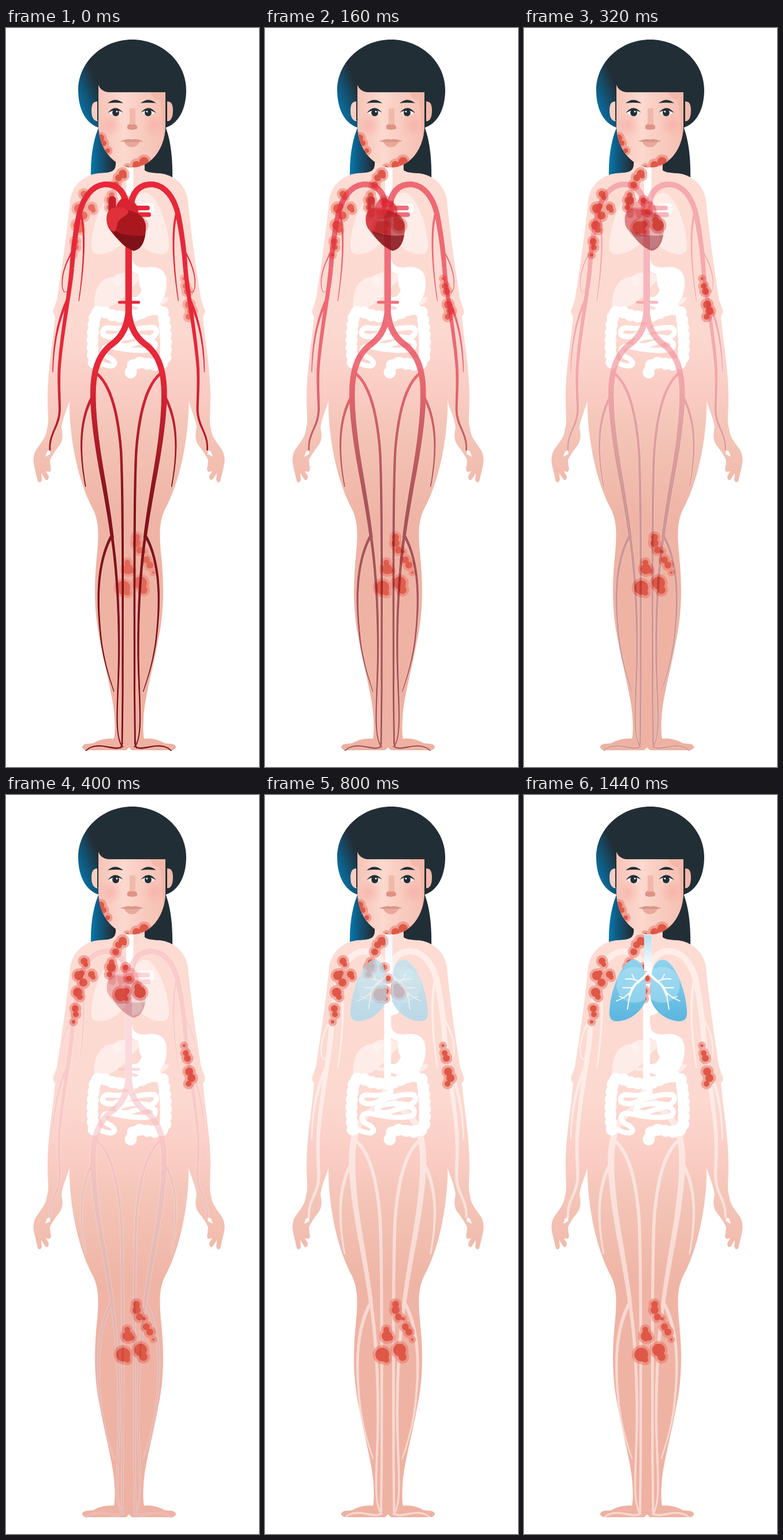
These frames come from a looping animation (438x1277 px, 1.52 s). An HTML page:

```html
<!DOCTYPE html>
<html lang="en">
<head>
<meta charset="utf-8">
<title>Body systems</title>
<style>
  html, body { margin: 0; width: 100%; height: 100%; overflow: hidden; background: #fff; }
  svg { display: block; width: 100vw; height: 100vh; }
</style>
</head>
<body>
<svg viewBox="0 0 438 1277" xmlns="http://www.w3.org/2000/svg">
  <defs>
    <linearGradient id="skin" gradientUnits="userSpaceOnUse" x1="0" y1="240" x2="0" y2="1250">
      <stop offset="0" stop-color="#fddcd3"/><stop offset=".28" stop-color="#fcd9d0"/>
      <stop offset=".395" stop-color="#facbc2"/><stop offset=".44" stop-color="#f4c6b9"/>
      <stop offset=".6" stop-color="#efb4a5"/><stop offset="1" stop-color="#eeb1a2"/>
    </linearGradient>
    <linearGradient id="face">
      <stop offset="0" stop-color="#f6c4b7"/><stop offset=".38" stop-color="#fcd8ce"/>
      <stop offset=".55" stop-color="#facfc4"/><stop offset="1" stop-color="#f5c0b2"/>
    </linearGradient>
    <linearGradient id="hair" gradientUnits="userSpaceOnUse" x1="126" y1="134" x2="166" y2="118">
      <stop offset="0" stop-color="#0870a4"/><stop offset=".4" stop-color="#115679"/><stop offset="1" stop-color="#222e36"/>
    </linearGradient>
    <linearGradient id="tail" gradientUnits="userSpaceOnUse" x1="147" y1="0" x2="186" y2="0">
      <stop offset="0" stop-color="#0879ae"/><stop offset=".3" stop-color="#0d5f89"/><stop offset="1" stop-color="#222e36"/>
    </linearGradient>
    <linearGradient id="blood" gradientUnits="userSpaceOnUse" x1="0" y1="590" x2="0" y2="830">
      <stop offset="0" stop-color="#e62839"/><stop offset=".4" stop-color="#b81f2b"/><stop offset="1" stop-color="#83131a"/>
    </linearGradient>
    <linearGradient id="air" gradientUnits="userSpaceOnUse" x1="0" y1="285" x2="0" y2="391">
      <stop offset="0" stop-color="#8fd3ee"/><stop offset="1" stop-color="#5bb5df"/>
    </linearGradient>
    <linearGradient id="pipe" gradientUnits="userSpaceOnUse" x1="0" y1="241" x2="0" y2="300">
      <stop offset="0" stop-color="#b5def0"/><stop offset="1" stop-color="#fff"/>
    </linearGradient>
    <radialGradient id="blush"><stop offset="0" stop-color="#f8a9a4" stop-opacity=".6"/><stop offset="1" stop-color="#f8a9a4" stop-opacity="0"/></radialGradient>
    <path id="facePath" d="M160 96V168C160 212 190 241 218 241C250 241 276 210 276 168V108Z"/>
    <clipPath id="inFace"><use href="#facePath"/></clipPath>
    <path id="side" d="M213 236H190C189 249 180 250 160 251C134 254 115 272 111 297C107 345 96 420 88 470L82 487Q80 492 85 498C81 545 72 590 72 640C72 666 75 680 71 692C70 706 62 715 52 729C46 740 47 750 50 762L55 783Q59 788 62 781L61 769L68 780Q74 784 74 774L69 766L76 767Q79 764 77 757L76 747Q80 737 92 722C100 712 98 700 96 690C99 670 108 655 109.500 644C110 720 128 790 150 830C160 850 161 870 158 905C152 960 152 1010 163 1060C172 1110 187 1160 188 1195C189 1215 188 1222 187 1228C170 1227 160 1231 151 1236L139 1237Q131 1239 132 1244L137 1248H208L213 1243Z"/>
    <path id="lung" d="M187 285C173 287 151 328 148 372C147 386 151 391 162 391C185 390 205 372 210 355C212 340 211 310 205 295C200 287 194 284 187 285Z"/>
    <clipPath id="inLung"><use href="#lung"/></clipPath>
    <g id="vesselSide"></g>
    <g id="vesselTree">
      <use href="#vesselSide"/><use href="#vesselSide" transform="matrix(-1 0 0 1 424.500 0)"/>
      <path d="M206.500 320H218V500L212.300 510L206.500 500Z"/><rect x="194" y="471.500" width="38" height="5" rx="2"/>
    </g>
    <g id="airSide">
      <use href="#lung" fill="url(#air)"/>
      <circle cx="191" cy="328" r="31" fill="#c4ebf8" opacity=".4" clip-path="url(#inLung)"/>
    </g>
    <g id="twigs" fill="none" stroke="#fff" stroke-linecap="round">
      <path stroke-width="4" d="M215 306Q209 314 199 322Q188 329 183 346"/>
      <path stroke-width="1.800" d="M199 322Q186 316 176 318M192 320L187 310M186 338Q176 350 160 356M183 346L179 370M173 351L165 348M188 333L171 333"/>
    </g>
  </defs>

  <g fill="#222e36">
    <path fill="url(#tail)" d="M162 168C152 190 146 220 147 257H200V168Z"/>
    <path d="M230 168H275C284 190 289 220 288 264L230 250Z"/>
  </g>

  <g fill="url(#skin)">
    <use href="#side"/><use href="#side" transform="matrix(-1 0 0 1 426 0)"/>
    <path d="M190 215H240V252H190Z"/><rect x="212" y="236" width="2" height="1007"/>
  </g>
  <g fill="#fff">
    <path d="M71 732L76 730L77 736L68 741Z"/><path d="M355 732L350 730L349 736L358 741Z"/>
  </g>

  <g id="head">
    <path fill="url(#hair)" d="M125 108C125 59 167 20 218.500 20C270 20 312 59 312 107C312 140 299 166 274 173V108H164V173C140 168 125 142 125 108Z"/>
    <path fill="#f8cdc2" d="M159 127Q148 126 148 142Q148 159 157 161H159Z"/>
    <path fill="#f3b8aa" d="M279 127Q289 126 289 142Q289 159 281 161H279Z"/>
    <use href="#facePath" fill="url(#face)"/>
    <path fill="#f0b3a4" d="M250 108H276V168C276 177 275 184 273 191C270 174 272 140 265 124Q251 123 250 108Z" opacity=".6"/>
    <path fill="#222e36" d="M158 94H279V160H276V111H178C167 110 162 104 160 98V160H158Z"/>
    <circle cx="180" cy="168" r="21" fill="url(#blush)"/><circle cx="256" cy="168" r="21" fill="url(#blush)"/>
    <path fill="#efb9ab" d="M214 139H224V166L227 174H210L214 164Z"/>
    <path fill="#df9283" d="M210 169Q212 165 218 167Q225 165 227 170Q228 175 224 175L218 176L212 175Q209 174 210 169Z"/>
    <path fill="#e8a99b" d="M204 196H232Q227 206 218 206Q209 206 204 196Z"/>
    <path fill="#d9968a" d="M197 196Q212 190 218 193Q224 190 238 196Q226 197 218 197Q208 197 197 196Z"/>
    <g id="eye">
      <path fill="#222e36" d="M176 130Q189 118.500 203 130Q190 128 176 130Z"/>
      <path fill="#fff" d="M179 147Q189 138 200 147Q190 155 179 147Z"/>
      <circle cx="190" cy="146.500" r="6" fill="#222e36"/><circle cx="192" cy="144.500" r="1.400" fill="#fff"/>
      <path fill="#222e36" d="M176 147Q189 130 202.500 146Q189 138 176 147Z"/>
    </g>
    <use href="#eye" transform="matrix(-1 0 0 1 436 0)"/>
  </g>

  <g id="organs" fill="#fff">
    <g opacity=".48"><use href="#lung"/><use href="#lung" transform="matrix(-1 0 0 1 430 0)"/></g>
    <path opacity=".5" d="M153 487C150 455 162 431 186 430C200 417 235 422 232 434L206 462C190 481 172 485 153 487Z"/>
    <circle cx="193" cy="437" r="8" opacity=".35"/>
    <path opacity=".5" d="M258 473Q270 463 282 466Q281 476 260 482Z"/>
    <path d="M208 241H220.500V320H208Z"/>
    <path opacity=".7" d="M232 303H254Q258 307 254 311H257Q259 318 250 325H232Z"/>
    <path d="M214 345C228 347 237 358 235 370Q232 380 218 381Z"/>
    <path d="M217 380C217 408 222 413 240 414C264 410 278 418 278 440C278 470 262 486 243 486C228 486 219 477 213 480L215 464C228 468 232 460 235 452C226 440 235 428 226 424C214 421 211 410 211 380Z"/>
    <rect x="206.500" y="318" width="11" height="180"/>
    <g fill="none" stroke="#fff" stroke-linecap="round" stroke-linejoin="round">
      <path stroke-width="21" stroke-dasharray="0 13" d="M152 578Q146 540 155 492Q166 487 180 495Q212 505 240 490Q262 480 272 492Q280 540 275 576Q262 586 240 579Q215 575 216 597"/>
      <path stroke-width="17" d="M152 576Q147 540 156 492Q166 489 180 495Q212 503 240 491Q262 483 271 492Q278 540 274 574Q262 582 240 579Q218 576 216 595"/>
      <path stroke-width="9" d="M218 490V512Q207 522 176 518Q165 520 168 530Q180 538 200 528Q238 515 257 518Q267 527 250 536Q215 529 195 540Q189 549 210 549L246 538Q264 542 256 554Q235 561 190 552Q168 546 168 558Q172 569 180 570Q194 580 183 584Q172 584 164 579"/>
    </g>
  </g>
  <use href="#vesselTree" fill="#fff" stroke="#fff" stroke-width="1" opacity=".5"/>

  <g id="neckRash"></g>
  <g id="faceRash" clip-path="url(#inFace)"></g>
  <g id="bodyRash"></g>

  <g id="vessels"><use href="#vesselTree" fill="url(#blood)"/></g>
  <g id="heart">
    <path fill="none" stroke="#c51f2b" stroke-width="13" stroke-linecap="round" d="M184 297V322"/>
    <path fill="none" stroke="#e62839" stroke-width="8" stroke-linecap="round" d="M206 302V320M219 302V320M222 311H245M228 322.500H247"/>
    <path fill="#d82431" d="M190 310C196 293 207 289 216 300Q231 301 229 326L196 330Z"/>
    <path fill="#ab171f" d="M188 312C174 314 172 335 178 346C186 358 202 377 221 385C236 382 243 362 242 341C239 322 222 316 205 314Z"/>
    <path fill="#7f1118" d="M183 348Q205 362 241 358C239 372 233 383 221 385C207 380 195 370 183 348Z"/>
    <path fill="#e0303a" d="M174 328Q175 312 190 310Q211 309 212 319C208 325 196 329 193 337Q192 347 188 352Q174 349 174 328Z"/>
  </g>

  <g id="lungVeil" fill="#cfe4ec">
    <use href="#lung"/><use href="#lung" transform="matrix(-1 0 0 1 430 0)"/>
  </g>
  <g id="lungs">
    <rect x="208" y="242" width="12.500" height="62" fill="url(#pipe)"/>
    <use href="#airSide"/><use href="#airSide" transform="matrix(-1 0 0 1 430 0)"/>
    <use href="#twigs"/><use href="#twigs" transform="matrix(-1 0 0 1 430 0)"/>
  </g>
</svg>
<script>
const $ = id => document.getElementById(id);
const NS = 'http://www.w3.org/2000/svg';

// Outline of a stroke whose width runs from w0 to w1.
function taper(d, w0, w1) {
  const path = document.createElementNS(NS, 'path');
  path.setAttribute('d', d);
  const length = path.getTotalLength(), steps = Math.ceil(length / 8);
  const left = [], right = [];
  for (let i = 0; i <= steps; i++) {
    const s = length * i / steps;
    const p = path.getPointAtLength(s);
    const a = path.getPointAtLength(Math.max(0, s - 1));
    const b = path.getPointAtLength(Math.min(length, s + 1));
    const angle = Math.atan2(b.y - a.y, b.x - a.x);
    const half = (w0 + (w1 - w0) * i / steps) / 2;
    const dx = -Math.sin(angle) * half, dy = Math.cos(angle) * half;
    left.push(`${(p.x + dx).toFixed(1)} ${(p.y + dy).toFixed(1)}`);
    right.unshift(`${(p.x - dx).toFixed(1)} ${(p.y - dy).toFixed(1)}`);
  }
  return `<path d="M${left.concat(right).join('L')}Z"/>`;
}

$('vesselSide').innerHTML = [
  ['M209 310C206 281 192 270 172 270C145 272 131 300 126 325C120 355 116 385 114 415', 11, 8],
  ['M114 415C110 460 96 530 92 590C91 620 93 645 93 660C92 690 74 700 76 730', 8, 3],
  ['M128 316C138 345 136 405 126 472', 4, 1.5],
  ['M114 387C101 411 95 430 98 452Q101 460 107 456', 2.5, 1.2],
  ['M107 468C92 500 82 540 81 595', 5, 1.5],
  ['M212 493C208 522 198 535 184 546C163 561 153 585 151 620', 11, 10],
  ['M151 620C149 660 157 720 168 780C175 820 180 850 184 882', 10, 6],
  ['M184 882C191 930 196 1000 195.500 1080C195 1140 190 1190 194 1220Q197 1240 203 1243', 5, 2],
  ['M157 597C185 620 195 680 199 730C203 800 202 1000 202 1150L201 1238', 5, 3],
  ['M149 638C125 682 128 740 138 793', 5, 1.8],
  ['M182 879C155 930 158 1000 165 1060C170 1095 178 1120 187 1147', 5, 1.5],
  ['M201 1236C202 1247 194 1245 186 1244C172 1242 152 1235 138 1249', 3, 2]
].map(args => taper(...args)).join('');

// Spots are "x,y,r" triples; the halos merge into one translucent shape.
function rash(id, spots) {
  const dots = grow => spots.trim().split(/\s+/).map(spot => {
    const [x, y, r] = spot.split(',').map(Number);
    return `<circle cx="${x}" cy="${y}" r="${r + grow}"/>`;
  }).join('');
  $(id).innerHTML += `<g fill="#e9786a" opacity=".55">${dots(4.5)}</g><g fill="#df5847">${dots(0)}</g>`;
}

rash('neckRash', '202,252,7 195,259,6 205,256,4 190,271,6');
rash('faceRash', '164,190,6 169,199,5 176,212,4 226,237,7 239,231,8 210,241,3');
rash('bodyRash', '183,289,5 182,298,8 179,310,5 207,298,5 213,317,5 199,345,11 208,339,6 208,352,4 232,341,10 228,332,6');
rash('bodyRash', '135,287,6 138,293,4 126,312,8 131,308,5 134,324,7 148,310,6 151,315,4 124,341,8 128,349,5 120,369,6 121,379,5 117,392,3');
rash('bodyRash', '308,433,2.5 311,446,5 314,455,6 317,478,7 321,489,7 316,499,5');
rash('bodyRash', '226,880,6 226,890,7 231,902,6 239,905,3 210,924,5 211,935,9 217,938,5 243,919,6 249,928,6 255,941,2 203,967,12 210,976,5 233,959,11 238,971,7');

const LOOP = 1520, STEP = 80;
const clamp = v => Math.min(1, Math.max(0, v));
const fade = (node, opacity) => node.setAttribute('opacity', opacity);

function render(ms) {
  const step = Math.floor((ms % LOOP) / STEP);
  const blood = 1 - clamp(step / 6);
  fade($('vessels'), blood);
  // Each heart part fades on its own, so overlaps stay denser.
  for (const part of $('heart').children) fade(part, blood);
  fade($('bodyRash'), 0.82 + 0.18 * clamp(step / 3));
  fade($('lungVeil'), step > 7 ? 0.6 : 0);
  fade($('lungs'), clamp((step - 7) / 11));
}

const start = performance.now();
function tick(now) {
  render(Math.max(0, now - start));
  requestAnimationFrame(tick);
}
render(0);
requestAnimationFrame(tick);
</script>
</body>
</html>
```
